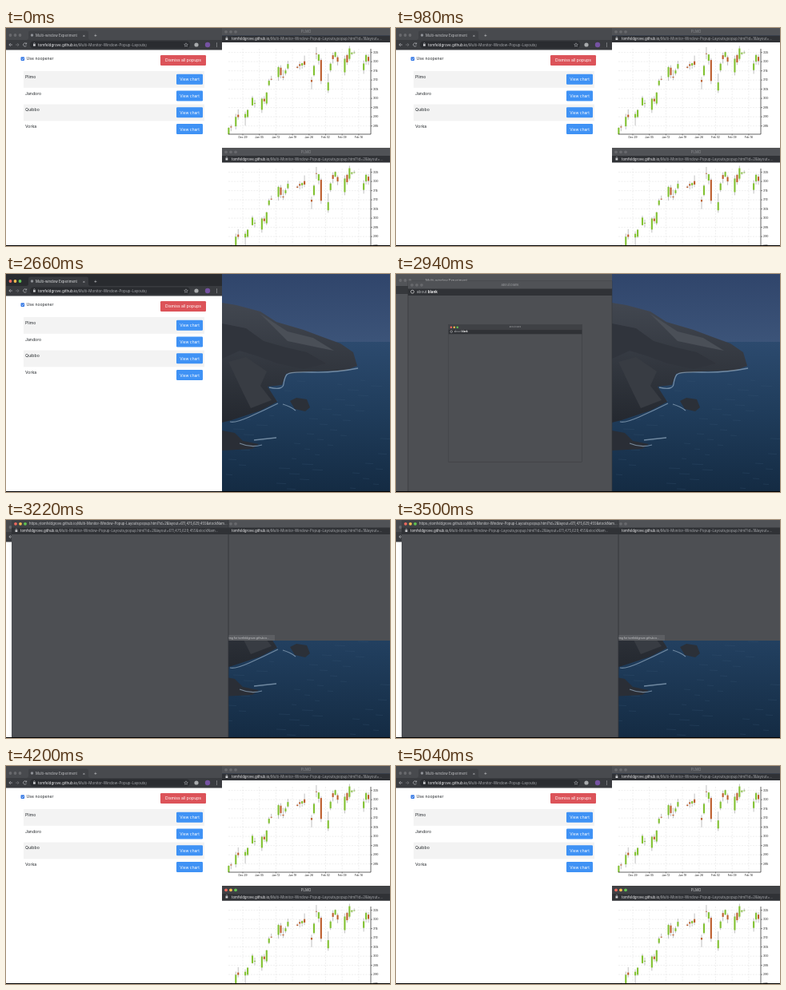
An HTML page that plays this animation: 480 by 273 pixels, repeating every 5110 ms.

```html
<!DOCTYPE html>
<html lang="en">
<head>
<meta charset="utf-8">
<title>Multi-window Experiment</title>
<style>
html, body { margin: 0; width: 100%; height: 100%; overflow: hidden; background: #000; }
svg { display: block; width: 100vw; height: 100vh; font-family: Inter, "Open Sans", sans-serif; }
.step { animation: 5110ms step-end infinite; }
#focusMain { animation-name: focusMain; }
#charts { animation-name: charts; }
#focusPopup { animation-name: focusPopup; }
#status { animation-name: status; }
#firstBlank { animation-name: firstBlank; }
#firstPlaced { animation-name: firstPlaced; }
#secondBlank { animation-name: secondBlank; }
#secondPlaced { animation-name: secondPlaced; }
#zoom { animation: zoom 5110ms linear infinite; transform-origin: 149px 149.5px; }
@keyframes focusMain { 0%, 54.78% { visibility: hidden; } 36.97% { visibility: visible; } }
@keyframes charts { 0%, 69.85% { visibility: visible; } 47.93% { visibility: hidden; } }
@keyframes focusPopup { 0% { visibility: hidden; } 69.85% { visibility: visible; } }
@keyframes status { 0%, 76.7% { visibility: hidden; } 69.85% { visibility: visible; } }
@keyframes firstBlank { 0%, 61.63% { visibility: hidden; } 54.78% { visibility: visible; } }
@keyframes firstPlaced { 0%, 69.85% { visibility: hidden; } 61.63% { visibility: visible; } }
@keyframes secondBlank { 0%, 63% { visibility: hidden; } 56.15% { visibility: visible; } }
@keyframes secondPlaced { 0%, 69.85% { visibility: hidden; } 63% { visibility: visible; } }
@keyframes zoom {
  0%, 56.15% { transform: scale(.35); }
  57.53% { transform: scale(.65); }
  58.9% { transform: scale(.88); }
  60.27%, 100% { transform: scale(1); }
}
</style>
</head>
<body>
<svg id="stage" viewBox="0 0 480 273" preserveAspectRatio="none">
  <defs>
    <linearGradient id="sky" x2="0" y2="1">
      <stop stop-color="#30456b"/><stop offset="1" stop-color="#3c5479"/>
    </linearGradient>
    <linearGradient id="sea" x2="0" y2="1">
      <stop stop-color="#2c4a6e"/><stop offset=".45" stop-color="#203d5c"/><stop offset="1" stop-color="#142b43"/>
    </linearGradient>
    <linearGradient id="rock" x2="0" y2="1">
      <stop stop-color="#424750"/><stop offset="1" stop-color="#24282f"/>
    </linearGradient>
  </defs>
</svg>
<script>
const HOST = 'tomfeldgrove.github.io';
const PATH = '/Multi-Monitor-Window-Popup-Layouts/';
const LIGHTS = ['#ee6a5f', '#f5bd4f', '#61c454'];

const rect = (x, y, w, h, fill, extra = '') =>
  `<rect x="${x}" y="${y}" width="${w}" height="${h}" fill="${fill}" ${extra}/>`;
const line = (x1, y1, x2, y2, stroke, extra = '') =>
  `<path d="M${x1} ${y1}L${x2} ${y2}" stroke="${stroke}" ${extra}/>`;
const text = (x, y, size, fill, str, extra = '') =>
  `<text x="${x}" y="${y}" font-size="${size}" fill="${fill}" ${extra}>${str}</text>`;
const path = (d, fill, extra = '') => `<path d="${d}" fill="${fill}" ${extra}/>`;
const layer = (id, body) => `<g id="${id}" class="step">${body}</g>`;
const MID = 'text-anchor="middle"';

const lights = (x, y, on) => LIGHTS.map((c, i) =>
  `<circle cx="${x + i * 6}" cy="${y}" r="1.9" fill="${on ? c : '#68696d'}"/>`).join('');

const lock = (x, y) => rect(x, y, 2.8, 2.4, '#d0d1d4') +
  path(`M${x + .6} ${y}v-.8a.8 .8 0 0 1 1.6 0v.8`, 'none', 'stroke="#d0d1d4" stroke-width=".5"');

const url = (x, y, size, tail) => text(x, y, size, '#a5a7ab',
  `<tspan fill="#f0f0f2">${HOST}</tspan>${PATH}${tail}`);

function wallpaper() {
  const foam = d => path(d, 'none', 'stroke="#8ba3ba" stroke-width="1.3" stroke-opacity=".75"');
  let waves = '';
  for (let i = 0; i < 60; i++) {
    const x = 272 + (i * 73) % 200, y = 128 + (i * 37) % 142;
    waves += line(x, y, x + 6 + i % 9, y + .6, '#365573', 'stroke-width=".5" stroke-opacity=".6"');
  }
  return rect(270, 0, 210, 87, 'url(#sky)') + rect(270, 85, 210, 188, 'url(#sea)') + waves +
    path('M270 36L288 39 318 47 338 60 372 70 396 79 418 87 434 98 439 115 424 121 382 122 350 125 345 139 327 141 339 160 318 171 282 183 270 186Z', 'url(#rock)') +
    path('M270 62L300 68 322 84 350 92 376 98 400 112 372 119 340 112 312 102 292 96 270 106Z', '#30343c') +
    path('M278 110L300 104 326 122 318 140 332 158 306 168 296 148Z', '#383c43') +
    path('M318 50L352 72 384 80 410 96 390 92 352 84Z', '#4a4f57') +
    path('M270 196L286 199 296 209 316 213 308 219 270 221Z', '#2a2e36') +
    path('M355 159L363 155 376 157 380 167 374 172 361 169Z', '#2b3038') +
    foam('M440 118Q410 124 382 123T351 126 347 138 329 142') +
    foam('M340 162Q322 171 304 179T280 185') +
    foam('M292 212Q306 218 320 214M310 208L338 205') + foam('M346 163Q356 166 362 171');
}

function mainWindow() {
  const rows = ['Plimo', 'Jandoro', 'Quibbo', 'Vorka'].map((name, i) => {
    const y = 54 + i * 20.8;
    return (i % 2 ? '' : rect(22, y, 226, 20.8, '#f3f3f3')) +
      text(24, y + 8.8, 5.2, '#24282c', name) +
      rect(213, y + 3.7, 33, 13, '#3f92f5', 'rx="1.3"') +
      text(229.5, y + 12.1, 4.9, '#fff', 'View chart', MID);
  }).join('');
  const strip = (on) => rect(0, 0, 270, 15, on ? '#292b2f' : '#484a4e') +
    path('M25 15Q28 15 28 12V6Q28 3.5 30 3.5H101Q103 3.5 103 6V12Q103 15 106 15Z', on ? '#393b3f' : '#3f4145') +
    lights(5.5, 9, on) + `<circle cx="32.5" cy="9" r="1.7" fill="#8f9297"/>` +
    text(37, 10.6, 4.3, on ? '#e2e3e5' : '#c3c4c7', 'Multi-window Experiment') +
    text(97.5, 10.9, 5, '#c8c9cc', '×', MID) + text(112, 11.2, 6.5, '#c8c9cc', '+', MID);
  const icon = 'stroke="#b9bbbf" stroke-width=".7"';
  return rect(0, 0, 270, 273, '#fff') + strip(false) +
    layer('focusMain', strip(true)) +
    rect(0, 15, 270, 12.5, '#393b3f') +
    rect(30, 16.5, 200, 9, '#2a2c30', 'rx="4.5"') +
    path('M8 21H4M5.8 19L3.8 21l2 2', 'none', icon) +
    path('M12 21h4M14.2 19l2 2-2 2', 'none', 'stroke="#77797d" stroke-width=".7"') +
    path('M25.3 19.6a2.1 2.1 0 1 0 .3 2.2M25.7 18.4v1.6h-1.6', 'none', icon) +
    lock(34, 20.2) + url(40, 22.7, 4.6, '') +
    path('M225 18.8l.7 1.5 1.6.2-1.2 1.1.3 1.6-1.4-.8-1.4.8.3-1.6-1.2-1.1 1.6-.2Z', 'none', 'stroke="#b9bbbf" stroke-width=".5"') +
    `<circle cx="238" cy="21" r="2.6" fill="#a9abad"/><circle cx="252" cy="21" r="3.2" fill="#7552a2"/>` +
    [19, 21, 23].map(y => `<circle cx="263.5" cy="${y}" r=".55" fill="#c8c9cc"/>`).join('') +
    rect(18.5, 36.3, 4.6, 4.6, '#3478e5', 'rx=".8"') +
    path('M19.6 38.7l1 1 1.5-2.1', 'none', 'stroke="#fff" stroke-width=".7"') +
    text(25.5, 40.4, 5.1, '#24282c', 'Use noopener') +
    rect(193, 34, 57, 13, '#dc5359', 'rx="1.3"') +
    text(221.5, 42.4, 5.1, '#fff', 'Dismiss all popups', MID) + rows;
}

// open and close price of each trading day
const PRICES = [
  280.5, 284, 284.7, 284.2, 284.8, 289.9, 291.1, 289.8, 289.5, 291.5, 289.9, 293.7,
  296.2, 300.3, 297.1, 297.5, 293.8, 299.8, 299.8, 298.4, 297.2, 303.2, 307.2, 309.6,
  310.6, 310.2, 311.6, 317, 316.7, 312.7, 311.8, 311.3, 313.6, 315.2, 316.3, 318.7,
  317.2, 316.6, 318.6, 317.7, 317.9, 319.2, 320.2, 318.3, 310, 309, 312.6, 317.7,
  324.5, 324.2, 320.5, 323.9, 320.9, 309.5, 304.3, 308.7, 315.3, 318.9, 323.5, 321.4,
  322.6, 325.2, 322.4, 320, 314.2, 321.6, 323.6, 319.6, 321.5, 327.2, 324.2, 324.9,
  324.7, 325, 315.4, 319, 320, 323.6, 322.6, 320.3
];
const CLOSED = [2, 9, 28, 56];
const LONG_LOW = { 4: 285.2, 22: 304.9, 24: 321.4, 29: 319, 39: 318.2 };
const LONG_HIGH = { 3: 294, 15: 315.5, 21: 323.3, 24: 327.9, 27: 313.5 };

function chart() {
  const py = p => 133 - (p - 280.5) * 2.3;
  const grid = 'stroke-width=".5" stroke-dasharray="2 1.5"';
  let out = '';
  for (let p = 285; p <= 325; p += 5) {
    const y = py(p);
    out += line(278, y, 456, y, '#dedede', grid) + line(456, y, 458, y, '#222', 'stroke-width=".5"') +
      text(459, y + 1.3, 3.5, '#222', p);
  }
  ['Dec 29', 'Jan 05', 'Jan 12', 'Jan 19', 'Jan 26', 'Feb 02', 'Feb 09', 'Feb 16'].forEach((d, i) => {
    const x = 296 + i * 20.7;
    out += line(x, 26, x, 133, '#dedede', grid) + line(x, 133, x, 134.5, '#222', 'stroke-width=".5"') +
      text(x, 138, 3.3, '#222', d, MID);
  });
  for (let i = 0, day = 0; i < PRICES.length / 2; day++) {
    if (day % 7 > 4 || CLOSED.includes(day)) continue;
    const open = PRICES[i * 2], close = PRICES[i * 2 + 1];
    const top = Math.max(open, close), low = Math.min(open, close);
    const x = 278.4 + day * 2.96, color = close >= open ? '#82c232' : '#bd5d2c';
    const high = LONG_HIGH[i] || top + .3 + (i * 7 % 5) * .35;
    const dip = LONG_LOW[i] || low - .3 - (i * 11 % 6) * .35;
    out += line(x, py(high), x, py(dip), '#777', 'stroke-width=".45"') +
      rect(x - 1.05, py(top), 2.1, Math.max(.8, py(low) - py(top)), color);
    i++;
  }
  return out + path('M278 133H456V26', 'none', 'stroke="#222" stroke-width=".7"');
}

const header = (x, y, w, on) => rect(x, y, w, 9.5, on ? '#3f4145' : '#505256') +
  rect(x, y + 9.5, w, 8.5, '#303236') + lights(x + 5, y + 4.8, on);

const popupBar = (y, id, on) => header(270, y, 210, on) +
  text(375, y + 6.3, 4.3, on ? '#d5d6d8' : '#8d8f93', 'PLMO', MID) +
  lock(274.5, y + 12.6) + url(282, y + 15.3, 4.45, `popup.html?id=${id}&amp;layout=...`);

function chartPopups() {
  const plot = chart();
  return rect(270, 18, 210, 133, '#fff') + plot + popupBar(0, 1, false) +
    layer('status', rect(270, 144, 70, 7, '#b9bbbe') + text(272, 148.9, 3.4, '#44464a', `Waiting for ${HOST}...`)) +
    rect(270, 168, 210, 105, '#fff') + `<g transform="translate(0 150)">${plot}</g>` +
    popupBar(150.5, 2, false) + layer('focusPopup', popupBar(150.5, 2, true)) +
    line(270, 150.5, 480, 150.5, '#222', 'stroke-width=".6"');
}

const blank = (x, y, w, h, on) => rect(x, y, w, h, '#4d4f53', 'stroke="#35373a" stroke-width=".6"') +
  header(x, y, w, on) + text(x + w / 2, y + 6, 4, '#97999c', 'about:blank', MID) +
  `<circle cx="${x + 5.5}" cy="${y + 13.2}" r="2" fill="none" stroke="#ddd" stroke-width=".7"/>` +
  text(x + 11, y + 15, 4.6, '#b9bbbe', 'about:<tspan fill="#fff" font-weight="600">blank</tspan>');

const firstBlank = () => rect(0, 0, 270, 273, '#525458') + rect(0, 15, 270, 10, '#36383c') +
  lights(5.5, 8, false) + text(37, 9.6, 4.3, '#b5b6b9', 'Multi-window Experiment') +
  blank(15, 9, 255, 264, false);

const firstPlaced = () => rect(270, 0, 210, 151, '#4d4f53') + header(270, 0, 210, false) +
  url(282, 15.2, 4.45, 'popup.html?id=1&amp;layout=...') +
  rect(270, 144, 66, 7, '#5c5e62') + text(272, 148.9, 3.4, '#cbccce', `Waiting for ${HOST}...`);

const secondPlaced = () => rect(7, 0, 271, 273, '#4d4f53') + header(7, 0, 271, true) +
  text(29, 6.3, 4.2, '#d0d1d3', `https://${HOST}${PATH}popup.html?id=2&amp;layout=611,475,629,455&amp;stockNam...`) +
  lock(11.5, 12.5) + url(18, 15.2, 4.45, 'popup.html?id=2&amp;layout=611,475,629,455&amp;stockNam...') +
  line(278, 0, 278, 273, '#323438', 'stroke-width=".8"');

document.getElementById('stage').insertAdjacentHTML('beforeend',
  wallpaper() + mainWindow() + layer('charts', chartPopups()) +
  layer('firstBlank', firstBlank()) + layer('firstPlaced', firstPlaced()) +
  layer('secondBlank', `<g id="zoom">${blank(21.5, 18, 255, 263, true)}</g>`) +
  layer('secondPlaced', secondPlaced()) + rect(0, 272, 480, 1, '#000'));
</script>
</body>
</html>
```
